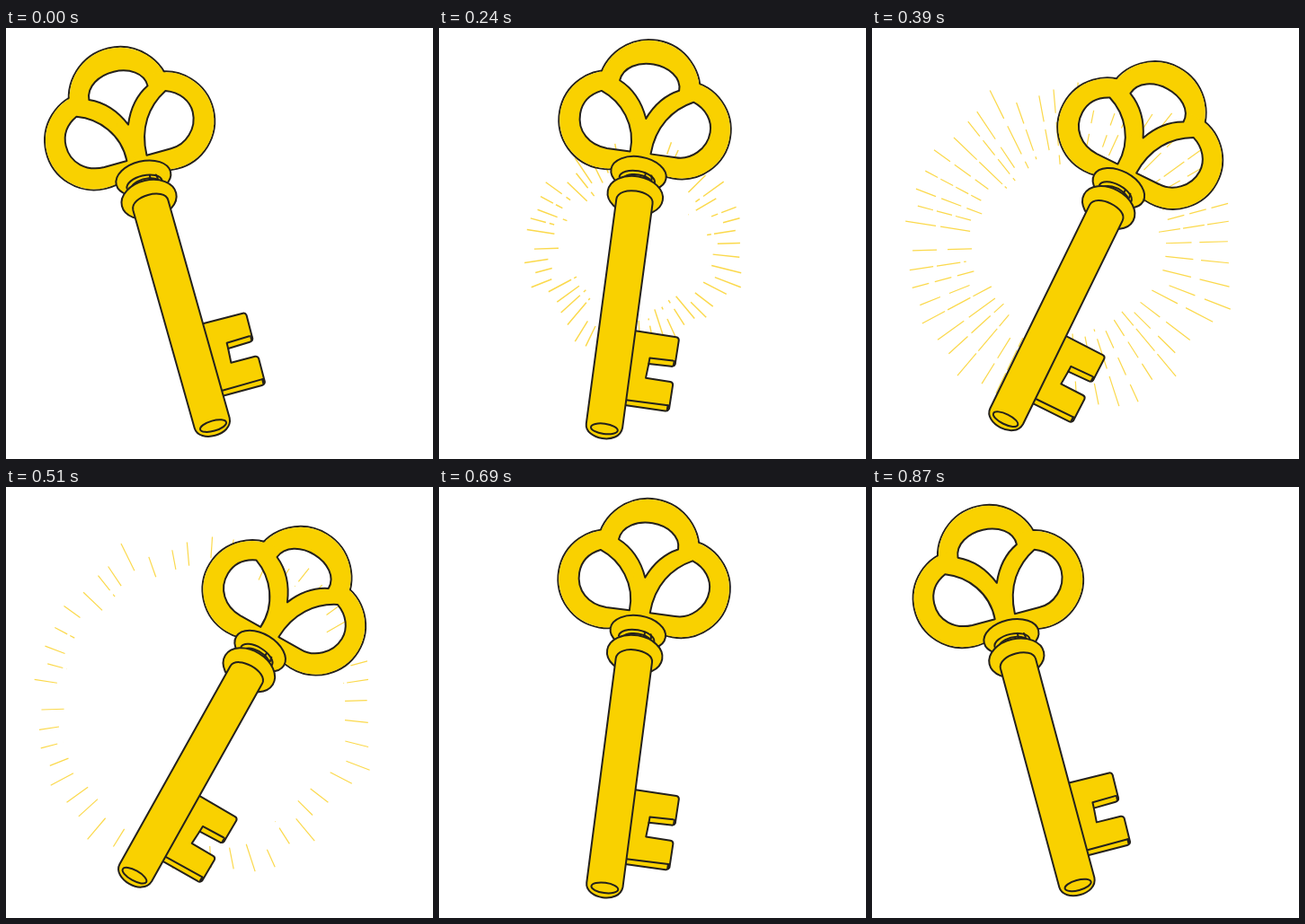
An HTML page with a canvas that plays this animation: 475x480 px, repeating every 0.9 s.

```html
<!DOCTYPE html>
<html lang="en">
<head>
<meta charset="utf-8">
<title>Key</title>
<style>
  html, body { margin: 0; width: 100%; height: 100%; overflow: hidden; background: #fff; }
  canvas { display: block; }
</style>
</head>
<body>
<canvas id="stage" width="475" height="480"></canvas>
<script>
const ctx = document.getElementById('stage').getContext('2d');
const LOOP = 900, STEP = 30;
const GOLD = '#f9d100', INK = '#24211c', RAY = '#fbd94c';
const PIVOT = { x: 199.3, y: 332 };
const BURST = { x: 217, y: 243, start: 106, full: 440, end: 545 };

const clamp = v => Math.min(1, Math.max(0, v));
const mix = (a, b, k) => a + (b - a) * k;
const progress = (t, from, to) => clamp((t - from) / (to - from));
const easeSine = k => (1 - Math.cos(Math.PI * k)) / 2;

function seeded(seed) {
  return () => {
    seed = (seed * 16807) % 2147483647;
    return seed / 2147483647;
  };
}

const random = seeded(4127);
const RAY_COUNT = 50;
const rays = Array.from({ length: RAY_COUNT }, (_, i) => ({
  angle: (i + 0.5 * (random() - 0.5)) * Math.PI * 2 / RAY_COUNT,
  inner: 68 + 28 * random(),
  reach: 174 + 28 * random(),
  delay: 28 * random(),
  dash: [14 + 24 * random(), 3 + 9 * random()]
}));

// Head, drawn as three lobes whose union forms the outline.
const lobes = [[188, 68, 57], [149, 107.5, 55], [231, 104.5, 55]];
const holes = [
  'M154 62C155 47 171 38 188 38C205 38 221 47 221 62Q200 73 190 99Q178 72 154 62Z',
  'M136 77C124 83 117 93 117 106C117 126 133 139 153 139L179 138C180 108 160 85 136 77Z',
  'M239 72C254 77 263 89 263 102C263 121 247 136 230 136L202 137C202 106 217 84 239 72Z'
].map(d => new Path2D(d));

const bit = new Path2D('M216 334L265 333Q268 333 268.5 336L269 363Q268 366 265 366L240 367.5' +
  'L239.5 383.5L267 383Q270 383 270.5 386L271 413Q270 416 267 416L220 417.5Z');
const bitLines = new Path2D('M240 367.5V361L266 359.5M222 411.5L269 409.5');
const bitEdge = new Path2D('M268 360V364M269.5 410V414');
const shaft = new Path2D('M173 193C173 177 213 176 213.5 191L223.5 443C223 463 184 463 183 445Z');
const neckMarks = new Path2D('M200 160V164M207 160.5L208 165');

function ellipse(x, y, rx, ry, tilt = 0, from = 0, to = Math.PI * 2) {
  const path = new Path2D();
  path.ellipse(x, y, rx, ry, tilt, from, to);
  return path;
}

function shape(path) {
  ctx.fillStyle = GOLD;
  ctx.fill(path);
  ctx.stroke(path);
}

function drawHead() {
  lobes.forEach(([x, y, r]) => ctx.stroke(ellipse(x, y, r, r)));
  ctx.fillStyle = GOLD;
  lobes.forEach(([x, y, r]) => ctx.fill(ellipse(x, y, r - 0.8, r - 0.8)));
}

// Everything except the three openings of the head.
function clipOutHoles() {
  const area = new Path2D();
  area.rect(-300, -300, 1100, 1100);
  holes.forEach(path => area.addPath(path));
  ctx.clip(area, 'evenodd');
}

function drawKey(angle) {
  ctx.save();
  ctx.translate(PIVOT.x, PIVOT.y);
  ctx.rotate(angle * Math.PI / 180);
  ctx.translate(-PIVOT.x, -PIVOT.y);
  ctx.strokeStyle = INK;
  ctx.lineWidth = 2;
  ctx.lineJoin = ctx.lineCap = 'round';

  ctx.save();
  clipOutHoles();
  drawHead();
  ctx.restore();
  holes.forEach(path => ctx.stroke(path));

  shape(ellipse(192.5, 161, 31, 19));
  ctx.stroke(ellipse(192, 168, 20, 10, 0, Math.PI, Math.PI * 2));
  ctx.stroke(ellipse(193, 171, 17, 9, 0, Math.PI * 1.1, Math.PI * 1.9));
  ctx.stroke(neckMarks);
  shape(ellipse(193, 185.5, 31, 21.5));

  shape(bit);
  ctx.stroke(bitLines);
  ctx.lineWidth = 3;
  ctx.stroke(bitEdge);
  ctx.lineWidth = 2;
  shape(shaft);
  ctx.stroke(ellipse(203.8, 447.3, 15, 5.7, -0.04));
  ctx.restore();
}

function drawRays(t) {
  if (t < BURST.start || t >= BURST.end) return;
  ctx.save();
  ctx.translate(BURST.x, BURST.y);
  ctx.strokeStyle = RAY;
  ctx.lineWidth = mix(1.5, 1.2, progress(t, 220, 400));
  for (const { angle, inner, reach, delay, dash } of rays) {
    const start = BURST.start + delay;
    const grow = easeSine(progress(t, start, BURST.full));
    const fade = Math.pow(progress(t, start, BURST.end), 3.5);
    const tip = mix(inner, reach, grow);
    const tail = mix(inner, reach, fade);
    if (tip <= tail) continue;
    const c = Math.cos(angle), s = Math.sin(angle);
    ctx.setLineDash(dash);
    ctx.beginPath();
    ctx.moveTo(c * tip, s * tip);
    ctx.lineTo(c * tail, s * tail);
    ctx.stroke();
  }
  ctx.restore();
}

function keyAngle(t) {
  const swing = easeSine(progress(t, -9, 480)) - easeSine(progress(t, 480, 905));
  return mix(-13.5, 32, swing);
}

function frame() {
  const t = Math.floor((performance.now() % LOOP) / STEP) * STEP;
  ctx.fillStyle = '#fff';
  ctx.fillRect(0, 0, 475, 480);
  drawRays(t);
  drawKey(keyAngle(t));
  requestAnimationFrame(frame);
}
frame();
</script>
</body>
</html>
```
